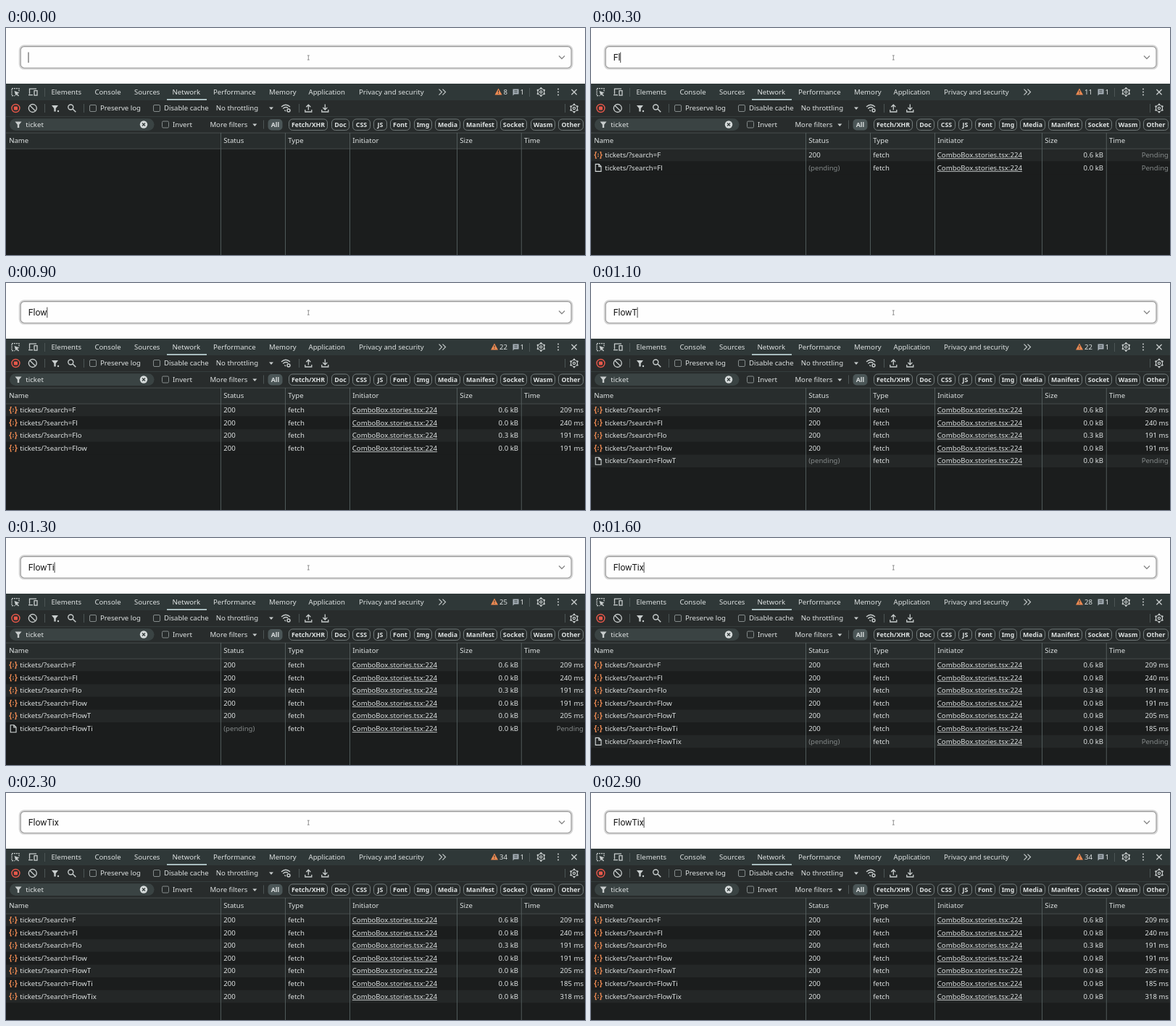
An HTML page with a canvas for the animation above (3 s loop, 799 px wide and 314 px high).

```html
<!DOCTYPE html>
<html lang="en">
<head>
<meta charset="utf-8">
<title>Search requests</title>
<style>
  html, body { margin: 0; width: 100%; height: 100%; overflow: hidden; background: #fefefe; }
  canvas { display: block; width: 799px; height: 314px; }
</style>
</head>
<body>
<canvas></canvas>
<script>
const W = 799, H = 314, LOOP = 3000;
const UI = '"Noto Sans", sans-serif';
const TEXT = '#dfe3e3', ICON = '#c8cdcd', DIM = '#858a8a', LINE = '#4c5555';
const ORANGE = '#ee8a52', RED = '#e8584a', TABBAR = '#2f3838';
const QUERY = 'FlowTix';

// One request per typed letter: time typed, time answered, size, duration.
const requests = [
  [100, 300, '0.6', 209], [200, 500, '0.0', 240], [500, 700, '0.3', 191], [600, 800, '0.0', 191],
  [1000, 1200, '0.0', 205], [1200, 1400, '0.0', 185], [1500, 1900, '0.0', 318],
].map(([typed, done, size, ms]) => ({ typed, done, size, ms }));

const warnings = [[0, 8], [300, 11], [500, 14], [600, 16], [700, 19], [800, 22], [1200, 25], [1400, 28], [1900, 34]];

const canvas = document.querySelector('canvas');
const ctx = canvas.getContext('2d');
const dpr = window.devicePixelRatio || 1;
canvas.width = W * dpr;
canvas.height = H * dpr;

function rect(x, y, w, h, color) {
  ctx.fillStyle = color;
  ctx.fillRect(x, y, w, h);
}

function text(str, x, y, { size = 9.6, color = TEXT, align = 'left', font = UI, weight = 400 } = {}) {
  ctx.font = `${weight} ${size}px ${font}`;
  ctx.fillStyle = color;
  ctx.textAlign = align;
  ctx.fillText(str, x, y);
  return ctx.measureText(str).width;
}

function box(x, y, w, h, r, { fill, stroke, width = 1 }) {
  ctx.beginPath();
  ctx.roundRect(x, y, w, h, r);
  if (fill) { ctx.fillStyle = fill; ctx.fill(); }
  if (stroke) { ctx.strokeStyle = stroke; ctx.lineWidth = width; ctx.stroke(); }
}

// Strokes or fills an SVG path placed at (x, y).
function icon(x, y, d, { color = ICON, width = 1.2, fill = false, dash = [] } = {}) {
  ctx.save();
  ctx.translate(x, y);
  ctx.strokeStyle = ctx.fillStyle = color;
  ctx.lineWidth = width;
  ctx.setLineDash(dash);
  const path = new Path2D(d);
  if (fill) ctx.fill(path); else ctx.stroke(path);
  ctx.restore();
}

function ring(x, y, r, color = ICON, width = 1.2) {
  ctx.beginPath();
  ctx.arc(x, y, r, 0, 7);
  ctx.strokeStyle = color;
  ctx.lineWidth = width;
  ctx.stroke();
}

function dot(x, y, r, color = ICON) {
  ctx.beginPath();
  ctx.arc(x, y, r, 0, 7);
  ctx.fillStyle = color;
  ctx.fill();
}

function gear(x, y) {
  ring(x, y, 4.5);
  ring(x, y, 1.6, ICON, 1.2);
  for (let i = 0; i < 6; i++) {
    const a = (i + 0.5) * Math.PI / 3;
    dot(x + 5.2 * Math.cos(a), y + 5.2 * Math.sin(a), 1.2);
  }
}

const funnel = (x, y) => icon(x, y, 'M-4.5-4H4.5L1.2.3V4.5H-1.2V.3Z', { fill: true });
const caretDown = (x, y) => icon(x, y, 'M-3-1.6H3L0 2Z', { fill: true });
const divider = (x, y) => rect(x, y - 6, 1, 12, LINE);

function checkbox(x, y, label) {
  box(x - 4.5, y - 4.5, 9, 9, 1.5, { stroke: '#848b8b' });
  text(label, x + 10, y + 3.3);
}

function drawField(t) {
  const typed = requests.filter(r => t >= r.typed);
  const lastKey = typed.length ? typed.at(-1).typed : 0;

  box(19.2, 24.7, 761.8, 31.4, 6, { stroke: '#d6d6d6', width: 3 });
  box(20.2, 25.6, 759.8, 29.6, 5, { fill: '#fefefe', stroke: '#979797', width: 1.1 });
  const width = text(QUERY.slice(0, typed.length), 30.7, 45,
    { size: 12.2, color: '#161616', font: 'Roboto, sans-serif' });
  if (Math.floor((t - lastKey) / 500) % 2 === 0) rect(30.5 + width, 33.5, 1, 14.5, '#444');
  icon(767, 40.5, 'M-4-2L0 2L4-2', { color: '#8a8a8a', width: 1.4 });
  icon(417.3, 41, 'M-1.5-3H1.5M0-3V3M-1.5 3H1.5', { color: '#777', width: 0.8 });
}

function drawTabs(t) {
  rect(0, 77, W, 23, TABBAR);
  icon(13, 88.6, 'M5-1V-5H-5V5H-1', { width: 1.3, dash: [2, 1] });
  icon(13, 88.6, 'M-1.5-1.5L5.5 1L2.6 2.4L5 5L4 6L1.5 3.3L.5 5.5Z', { fill: true });
  icon(37, 88.6, 'M-4.5 3V-4.5H5M-6 4H0M2-2H6V4.5H2Z', { width: 1.3 });
  rect(53, 83, 1, 12, LINE);

  [['Elements', 62.5], ['Console', 122.5], ['Sources', 177], ['Network', 229.5], ['Performance', 286],
   ['Memory', 363], ['Application', 417.5], ['Privacy and security', 487]]
    .forEach(([label, x]) => text(label, x, 92.2));
  rect(222, 98, 55, 2, '#a9bdbf');
  icon(602, 88.6, 'M-4.5-4L-.5 0L-4.5 4M.5-4L4.5 0L.5 4');

  const count = warnings.filter(([from]) => t >= from).at(-1)[1];
  const width = text(String(count), 692, 92.2, { align: 'right' });
  icon(685 - width, 88.2, 'M0-4.8L5 4.2H-5Z', { color: ORANGE, fill: true });
  rect(684.5 - width, 86.2, 1, 3, TABBAR);
  rect(684.5 - width, 90, 1, 1, TABBAR);
  icon(703.5, 88.6, 'M-4-4.2H4V2.8H-2L-4 4.8Z', { color: '#a9b2ba', fill: true });
  rect(701.3, 86.3, 4.4, 0.9, TABBAR);
  rect(701.3, 88.5, 4.4, 0.9, TABBAR);
  text('1', 709.5, 92.2);
  divider(722, 89);
  gear(738.3, 88.5);
  [-4, 0, 4].forEach(dy => dot(762, 88.6 + dy, 1));
  icon(784, 88.6, 'M-3.6-3.6L3.6 3.6M3.6-3.6L-3.6 3.6', { width: 1.3 });
}

function drawToolbar() {
  const y = 111;
  rect(0, 100, W, 45, '#282c2c');
  rect(0, 122, W, 1, '#353c3c');
  ring(13.4, y, 5.5, RED, 1.4);
  box(10.8, y - 2.6, 5.2, 5.2, 1, { fill: RED });
  ring(36.8, y, 5.5, ICON, 1.3);
  icon(36.8, y, 'M-3.8-3.8L3.8 3.8', { width: 1.3 });
  divider(53, y);
  funnel(67.5, y);
  dot(72, y + 4, 1.2);
  ring(89.3, y - 1.5, 3.5, ICON, 1.4);
  icon(91, y, 'M1 1L5.3 5.3', { width: 1.5 });
  divider(107, y);
  checkbox(120, y, 'Preserve log');
  checkbox(208, y, 'Disable cache');
  text('No throttling', 289.8, y + 3.3);
  caretDown(366, y);
  icon(386, y, 'M-6-2Q0-7.5 6-2M-3.8.4Q0-3 3.2-.2M-1.6 2.5L0 4', { width: 1.3 });
  ring(390, y + 3, 2, ICON, 1.4);
  divider(404, y);
  icon(417.3, y, 'M0 2.5V-4.5M-3-1.8L0-4.8L3-1.8M-4.5 2V5H4.5V2', { width: 1.3 });
  icon(440.3, y, 'M0-5.5V2M-3-1L0 2L3-1M-4.5 2V5H4.5V2', { width: 1.3 });
  divider(771, y);
  gear(784, y);
}

function drawFilters() {
  const y = 133.5;
  box(5, 125.3, 199.5, 16.6, 8.3, { fill: '#3a4343' });
  funnel(17, y);
  text('ticket', 27.3, y + 3.3);
  dot(190, y, 5.2, '#d5dada');
  icon(190, y, 'M-2-2L2 2M2-2L-2 2', { color: '#303838' });
  checkbox(220, y, 'Invert');
  text('More filters', 281.4, y + 3.3);
  caretDown(343.3, y + 0.6);
  divider(355, y);

  [['All', 361, 21], ['Fetch/XHR', 390, 54], ['Doc', 449, 25], ['CSS', 478, 25], ['JS', 507, 19],
   ['Font', 530, 28], ['Img', 563, 25], ['Media', 592, 35], ['Manifest', 631, 47], ['Socket', 682, 37],
   ['Wasm', 724, 34], ['Other', 762, 35]].forEach(([label, x, w], i) => {
    box(x + 0.5, 126, w - 1, 15.4, 5, i ? { stroke: '#737c7c' } : { fill: '#4b5657' });
    text(label, x + w / 2, y + 3.2, { size: 8.8, align: 'center', weight: 600 });
  });
}

function drawRow(request, i, t) {
  const y = 175.8 + i * 17.6, base = y + 3.2;
  const done = t >= request.done;
  rect(0, y - 8.8, W, 17.6, i % 2 ? '#1b1d1d' : '#242727');
  if (done) {
    const side = 'M-2.2-4.2H-3.6V-1.4L-5 0L-3.6 1.4V4.2H-2.2';
    icon(10, y, side + 'M2.2-4.2H3.6V-1.4L5 0L3.6 1.4V4.2H2.2', { color: ORANGE, width: 1.3 });
    icon(10, y, 'M-.7-2H.7V-.6H-.7ZM-.7 .8H.7V2L-.7 3Z', { color: ORANGE, fill: true });
  } else {
    icon(10, y, 'M-3.8-5H1L4-2V5H-3.8ZM.8-5V-1.8H4', { color: '#d5dada', width: 1.1 });
  }
  text('tickets/?search=' + QUERY.slice(0, i + 1), 19.2, base);
  text(done ? '200' : '(pending)', 300.2, base, { color: done ? TEXT : DIM });
  text('fetch', 389.2, base);
  const width = text('ComboBox.stories.tsx:224', 477.8, base);
  rect(477.8, base + 1.3, width, 0.8, TEXT);
  text((done ? request.size : '0.0') + ' kB', 707, base, { align: 'right' });
  const timed = t >= request.done + 100;
  text(timed ? request.ms + ' ms' : 'Pending', 797, base, { align: 'right', color: timed ? TEXT : DIM });
}

function drawTable(t) {
  rect(0, 145, W, H - 145, '#1b1d1d');
  rect(0, 145, W, 22, '#282d2d');
  requests.forEach((request, i) => { if (t >= request.typed) drawRow(request, i, t); });
  rect(0, 144.7, W, 0.8, LINE);
  rect(0, 166.7, W, 0.8, LINE);
  [['Name', 0], ['Status', 296], ['Type', 385], ['Initiator', 474], ['Size', 622], ['Time', 710.8]]
    .forEach(([label, x]) => {
      text(label, x + 4.2, 159.1);
      if (x) rect(x, 145, 0.9, H - 145, '#566060');
    });
}

function frame(now) {
  const t = Math.floor(now % LOOP / 100) * 100;
  ctx.setTransform(dpr, 0, 0, dpr, 0, 0);
  rect(0, 0, W, H, '#fefefe');
  drawField(t);
  drawTabs(t);
  drawToolbar();
  drawFilters();
  drawTable(t);
  requestAnimationFrame(frame);
}
requestAnimationFrame(frame);
</script>
</body>
</html>
```
